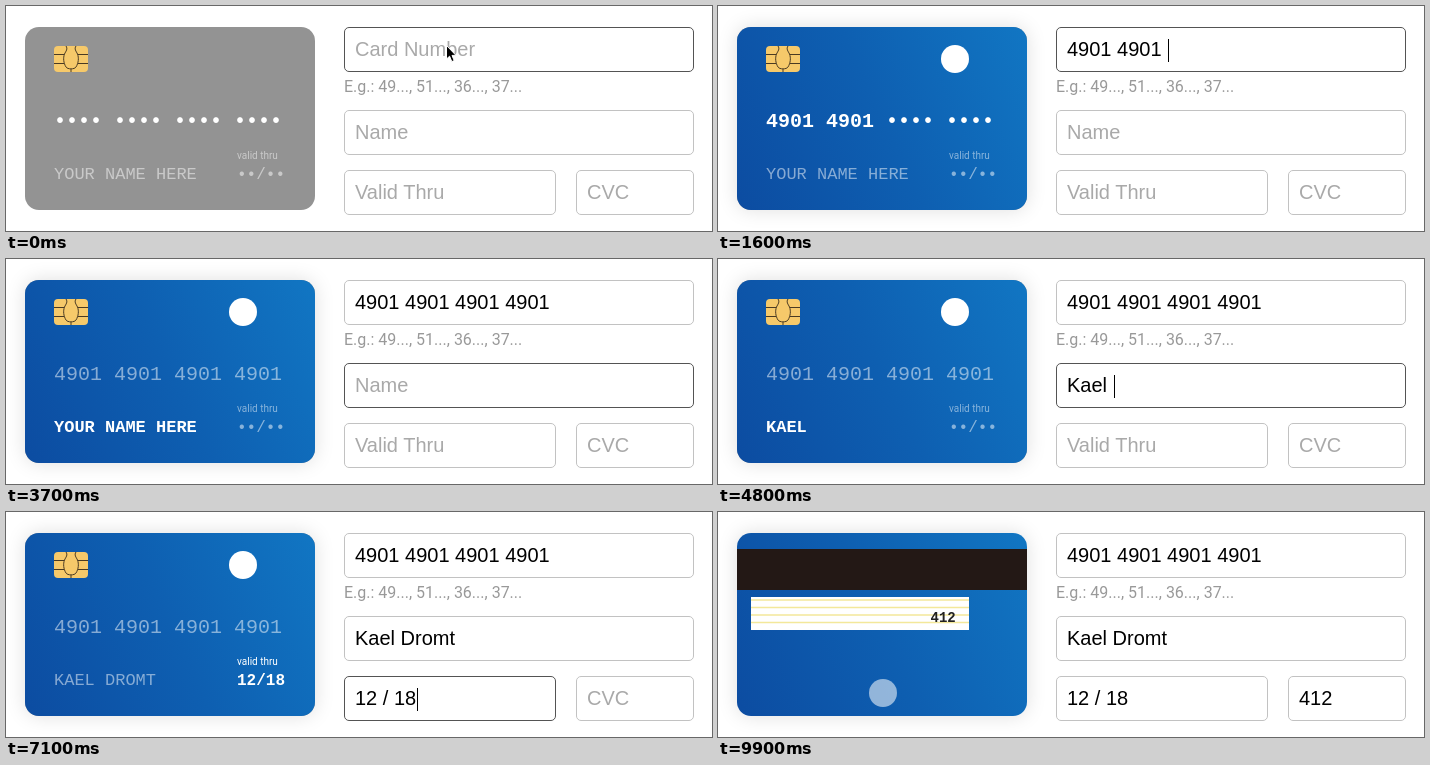
Recreate the animation shown at these times as an HTML page. Size 706 px wide and 225 px high, loop 10000 ms.

```html
<!DOCTYPE html>
<html lang="en">
<head>
<meta charset="utf-8">
<title>Payment card form</title>
<style>
html, body { margin: 0; width: 100%; height: 100%; overflow: hidden; background: #fff; }
#stage { position: relative; width: 706px; height: 225px; overflow: hidden; }
#scene { position: absolute; left: 19px; top: 21px; width: 290px; height: 183px; perspective: 1000px; }
#card { position: relative; width: 100%; height: 100%; border-radius: 14px; transform-style: preserve-3d; }
.face { position: absolute; inset: 0; border-radius: 14px; overflow: hidden; backface-visibility: hidden; }
.front { background: #939393; }
.back { transform: rotateY(180deg); }
.blue { position: absolute; inset: 0; background: linear-gradient(65deg, #0c4ca1 0%, #0e5fb1 50%, #1176c3 100%); }
.face svg { position: absolute; left: 0; top: 0; }
.face text { fill: #fff; font-family: "Courier New", Courier, "Liberation Mono", monospace; white-space: pre; }
.face .tiny { font: 10px Roboto, sans-serif; }
.field {
  position: absolute; box-sizing: border-box; height: 45px; padding-left: 10px;
  border: 1px solid #c2c2c2; border-radius: 5px;
  font: 20px/43px Helvetica, Arial, "Liberation Sans", sans-serif; color: #000; white-space: pre;
}
.hint { position: absolute; left: 10px; top: 0; color: #a9a9a9; }
.caret { position: relative; display: inline-block; width: 0; height: 23px; vertical-align: middle; }
.caret::after { content: ""; position: absolute; left: 1px; top: 0; width: 1px; height: 23px; background: #000; }
.note { position: absolute; left: 338px; top: 71px; font: 16px/19px Roboto, sans-serif; color: #999; white-space: pre; }
#mouse { position: absolute; left: 439px; top: 38px; }
</style>
</head>
<body>
<div id="stage">
  <div id="scene">
    <div id="card">
      <div class="face front">
        <div class="blue" id="tint"></div>
        <svg width="290" height="183">
          <g transform="translate(29 19)">
            <rect width="34" height="26" rx="4" fill="#f6c96a"/>
            <path fill="none" stroke="#4a3a22" stroke-width="1"
              d="M0 8.5H10M0 17.5H10M24 8.5H34M24 17.5H34M12 0C14 3 12 5 10.500 8C9 12 9.500 17 12 21C13.500 23.500 20.500 23.500 22 21C24.500 17 25 12 23.500 8C22 5 20 3 22 0M17 23V26"/>
          </g>
          <circle id="mark" cx="218" cy="32" r="14" fill="#fff"/>
          <text id="num" x="29" y="100" font-size="20"></text>
          <text id="owner" x="29" y="152" font-size="17"></text>
          <g id="until">
            <text class="tiny" x="212" y="131.500">valid thru</text>
            <text id="date" x="212" y="152" font-size="16"></text>
          </g>
        </svg>
      </div>
      <div class="face back">
        <div class="blue"></div>
        <svg width="290" height="183">
          <rect y="16" width="290" height="41" fill="#231815"/>
          <rect x="14" y="64" width="218" height="33" fill="#fff"/>
          <path d="M14 67H232M14 74.500H232M14 82H232M14 89.500H232" stroke="#f3e89a" stroke-width="1.300"/>
          <text id="code" x="193.500" y="89" font-size="14" font-weight="bold" style="fill:#222"></text>
          <circle cx="146" cy="160" r="14" fill="#fff" opacity=".55"/>
        </svg>
      </div>
    </div>
  </div>
  <div class="note">E.g.: 49..., 51..., 36..., 37...</div>
  <svg id="mouse" width="13" height="20">
    <path d="M1.500 1.500V15L4.600 12.200L6.800 17.600L9.200 16.600L7 11.400H11Z" fill="#000" stroke="#fff" stroke-width="1"/>
  </svg>
</div>
<script>
const LOOP = 10000, STEP = 100;
const $ = id => document.getElementById(id);
const clamp = x => Math.min(1, Math.max(0, x));
const run = (from, n) => Array.from({ length: n }, (_, i) => from + i * STEP);

const fields = [
  { hint: 'Card Number', x: 338, y: 21, w: 350, from: -1000, to: 3200,
    text: '4901'.repeat(4), keys: [500, 1200, 2100, 2700].flatMap(t => run(t, 4)),
    show: s => s.replace(/.{4}/g, '$& ') },
  { hint: 'Name', x: 338, y: 104, w: 350, from: 3200, to: 5600,
    text: 'Kael Dromt', keys: [3800, 4000, 4300, 4400, 4800, 4900, 5000, 5200, 5300, 5400] },
  { hint: 'Valid Thru', x: 338, y: 164, w: 212, from: 5600, to: 7400,
    text: '1218', keys: [6300, 6400, 6900, 7000],
    show: s => s.replace(/^../, '$& / ') },
  { hint: 'CVC', x: 570, y: 164, w: 118, from: 7400, to: 9700,
    text: '412', keys: [8400, 8600, 8900] }
];
const caretOff = [[0, 300], [1900, 2100], [3700, 3800], [6100, 6300], [6700, 6900], [7900, 8100], [9200, 9500]];

for (const f of fields) {
  const box = f.box = document.createElement('div');
  box.className = 'field';
  box.style.cssText = `left:${f.x}px;top:${f.y}px;width:${f.w}px`;
  box.innerHTML = `<span class="hint">${f.hint}</span><span></span><i class="caret"></i>`;
  [f.label, f.value, f.caret] = box.children;
  $('stage').insertBefore(box, $('mouse'));
}

function highlight(el, f) {
  el.style.opacity = 0.5 + 0.5 * f.level;
  el.style.fontWeight = f.active ? 'bold' : 'normal';
}

function draw(t) {
  const blink = !caretOff.some(([a, b]) => t >= a && t < b);
  for (const f of fields) {
    f.typed = f.text.slice(0, f.keys.filter(k => k <= t).length);
    f.active = t >= f.from && t < f.to;
    f.level = clamp((t - f.from) / 200) - clamp((t - f.to) / 200);
    f.value.textContent = f.show ? f.show(f.typed) : f.typed;
    f.label.style.display = f.typed ? 'none' : '';
    f.caret.style.display = f.active && blink ? '' : 'none';
    const grey = Math.round(194 - 110 * f.level);
    f.box.style.borderColor = `rgb(${grey},${grey},${grey})`;
  }

  const [num, name, date, code] = fields;
  $('num').textContent = num.typed.padEnd(16, '•').replace(/.{4}(?=.)/g, '$& ');
  $('owner').textContent = name.typed.toUpperCase() || 'YOUR NAME HERE';
  $('date').textContent = date.typed.padEnd(4, '•').replace(/^../, '$&/');
  $('code').textContent = code.typed;
  highlight($('num'), num);
  highlight($('owner'), name);
  $('until').style.opacity = 0.5 + 0.5 * date.level;
  $('date').style.fontWeight = date.active ? 'bold' : 'normal';

  const known = clamp((t - 400) / 500);
  $('tint').style.opacity = $('mark').style.opacity = known;
  $('card').style.boxShadow = `0 0 20px rgba(0,0,0,${0.13 * known})`;

  const p = clamp((t - 7300) / 300);
  $('card').style.transform = `rotateY(${180 * p * p * (3 - 2 * p)}deg)`;
  $('mouse').style.display = t < 500 ? '' : 'none';
}

let start;
function tick(now) {
  start ??= now;
  draw(Math.floor(((now - start) % LOOP) / STEP) * STEP);
  requestAnimationFrame(tick);
}
draw(0);
requestAnimationFrame(tick);
</script>
</body>
</html>
```
